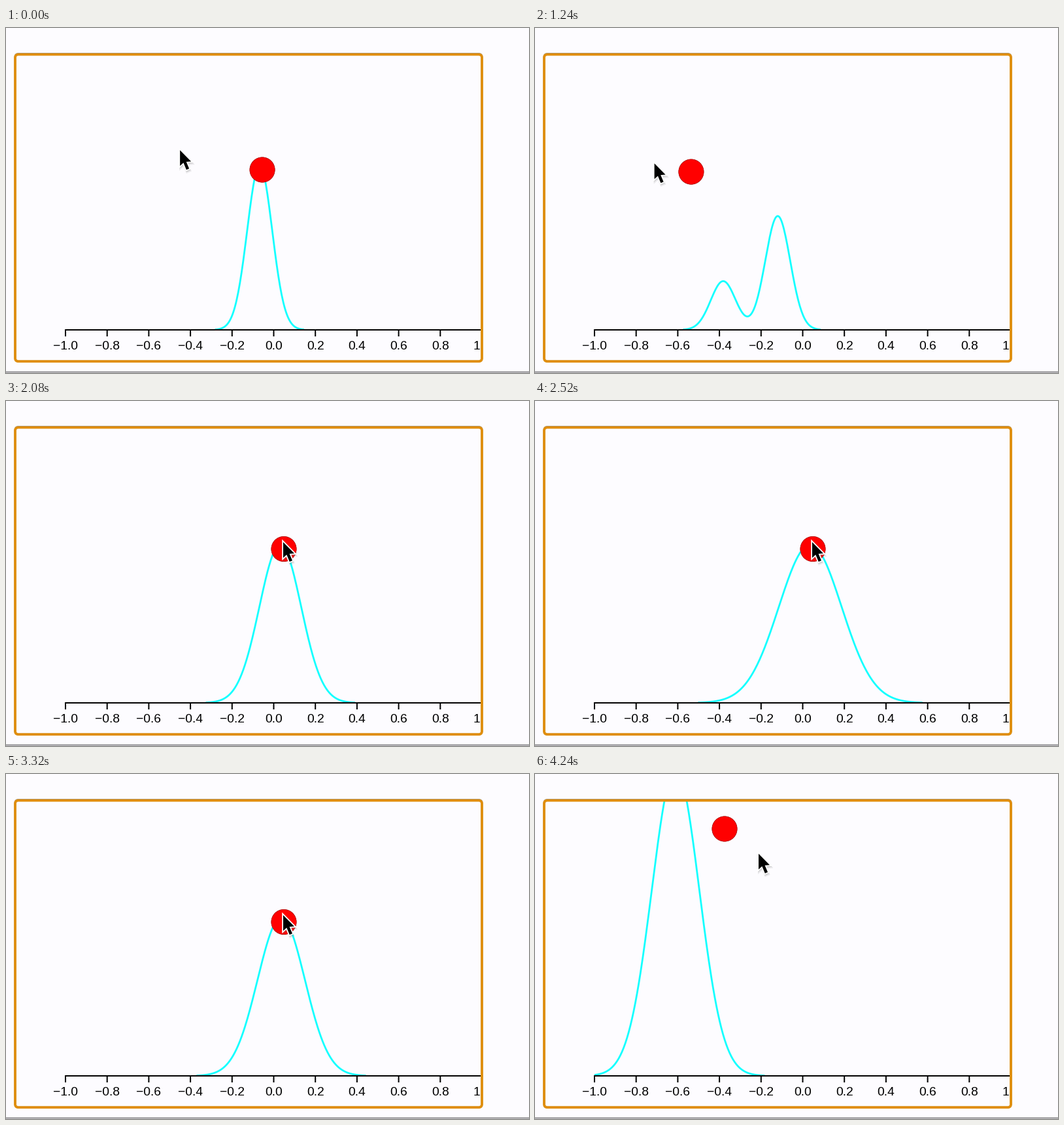
A matplotlib script for the animation above (4.28 s loop, 800 px wide and 528 px high).

```python
import numpy as np
import matplotlib.pyplot as plt
from matplotlib.animation import FuncAnimation
from matplotlib.patches import Circle, FancyBboxPatch, Polygon, Rectangle

W, H, DPI = 800, 528, 100
STEP, FRAMES = 40, 107
PX = 72 / DPI
BASE, ZERO, UNIT = 462, 409.5, 318.5
PAPER, ORANGE, CYAN = "#fdfcff", "#e08e0b", "#14ffff"


def smooth(t, t0, t1):
    u = min(max((t - t0) / (t1 - t0), 0), 1)
    return u * u * (3 - 2 * u)


def travel(t, start, *legs):
    """Ease from start through legs of (begin, end, goal)."""
    value = np.array(start, float)
    for t0, t1, goal in legs:
        value = value + (np.array(goal) - value) * smooth(t, t0, t1)
    return value


def swing(middle, reach, degrees):
    return middle + reach * np.cos(np.radians(degrees))


def mouse_at(t):
    start = swing(293, 111, 104 + 0.3565 * t), 187 + 0.0163 * t
    return travel(t, start, (1640, 1880, (424, 216)),
                  (3340, 3580, (230, -45)), (4120, 4240, (342, 122)))


def ball_at(t):
    """The ball trails the mouse and slowly catches up."""
    t = max(t, 0)
    start = swing(300, 100, 23 + 0.3346 * t + 3.235e-5 * t * t), 217 + 0.0025 * t
    return travel(t, start, (1640, 1900, (425, 226.5)),
                  (3400, 3685, (219, -1.5)), (4160, 4240, (290, 84)))


def spread_at(t):
    return UNIT * travel(t, 0.06, (1950, 2300, 0.19), (2300, 2800, 0.095),
                         (2900, 3250, 0.114))


fig = plt.figure(figsize=(W / DPI, H / DPI), dpi=DPI, facecolor=PAPER)
ax = fig.add_axes([0, 0, 1, 1])
ax.set(xlim=(0, W), ylim=(H, 0))
ax.axis("off")

view = Rectangle((15, 42), 711.5, 467, fc="none", ec="none")
ax.add_patch(view)


def inside(artist):
    artist.set_clip_path(view)
    return artist


def rule(xs, ys, color="black", width=2, z=4):
    return ax.plot(xs, ys, color=color, lw=width * PX, zorder=z,
                   solid_capstyle="butt", snap=False)[0]


# Axis with ticks and labels
inside(rule([90, 728], [BASE, BASE]))
for i in range(-5, 6):
    x = ZERO + UNIT * i / 5
    inside(rule([x, x], [BASE, BASE + 10]))
    label = f"{i / 5:.1f}".replace("-", "\u2212")
    inside(ax.text(x, 492, label, family="Liberation Sans", size=19.3 * PX,
                   ha="center", va="baseline", zorder=4, clip_on=True))

# Page frame
for dy, color, width in ((-1, "#9a9a9a", 3), (0, ORANGE, 3.8)):
    ax.add_patch(FancyBboxPatch(
        (14, 40.5 + dy), 714, 469.7 - dy,
        boxstyle="round,pad=0,rounding_size=5",
        fc="none", ec=color, lw=width * PX, zorder=6, snap=False))
rule([0, W], [526.5, 526.5], "#77777a", 1.6)

# Moving parts
xs = np.linspace(ZERO - UNIT, ZERO + UNIT, 500)
curve = inside(rule(xs, xs, CYAN, 2.8, 2))
ball = Circle((0, 0), 19.2, fc="#ff0000", ec="#a00000", lw=0.7 * PX, zorder=5)
ax.add_patch(ball)
inside(ball)

ARROW = np.array([(0, 0), (0, 24), (5.3, 19.2), (9.8, 30), (14, 28.2),
                  (9.6, 17.8), (17, 17.3)])
layers = []
for drop, color, edge, alpha in ((3, "#808080", 4, 0.15), (1.5, "#808080", 3, 0.2),
                                 (0, "white", 3.6, 1), (0, "black", 0, 1)):
    part = Polygon(ARROW, fc=color, ec=color, lw=edge * PX, alpha=alpha, zorder=8)
    ax.add_patch(part)
    layers.append((part, ARROW + (drop / 3, drop)))


def bump(t, sigma):
    x, y = ball_at(t)
    return (BASE + 6.5 - y) * np.exp(-0.5 * ((xs - x + 4) / sigma) ** 2)


def draw(n):
    t = n * STEP
    sigma = spread_at(t)
    height = 0.7 * bump(t - 212, sigma) + 0.3 * bump(t - 80, sigma)
    curve.set_ydata(np.where(height > 0.4, BASE - height, np.nan))
    ball.center = tuple(ball_at(t))
    for part, shape in layers:
        part.set_xy(shape + mouse_at(t))
    return [curve, ball] + [part for part, _ in layers]


anim = FuncAnimation(fig, draw, frames=FRAMES, interval=STEP,
                     repeat=True, repeat_delay=0, blit=False)
plt.show()
```
